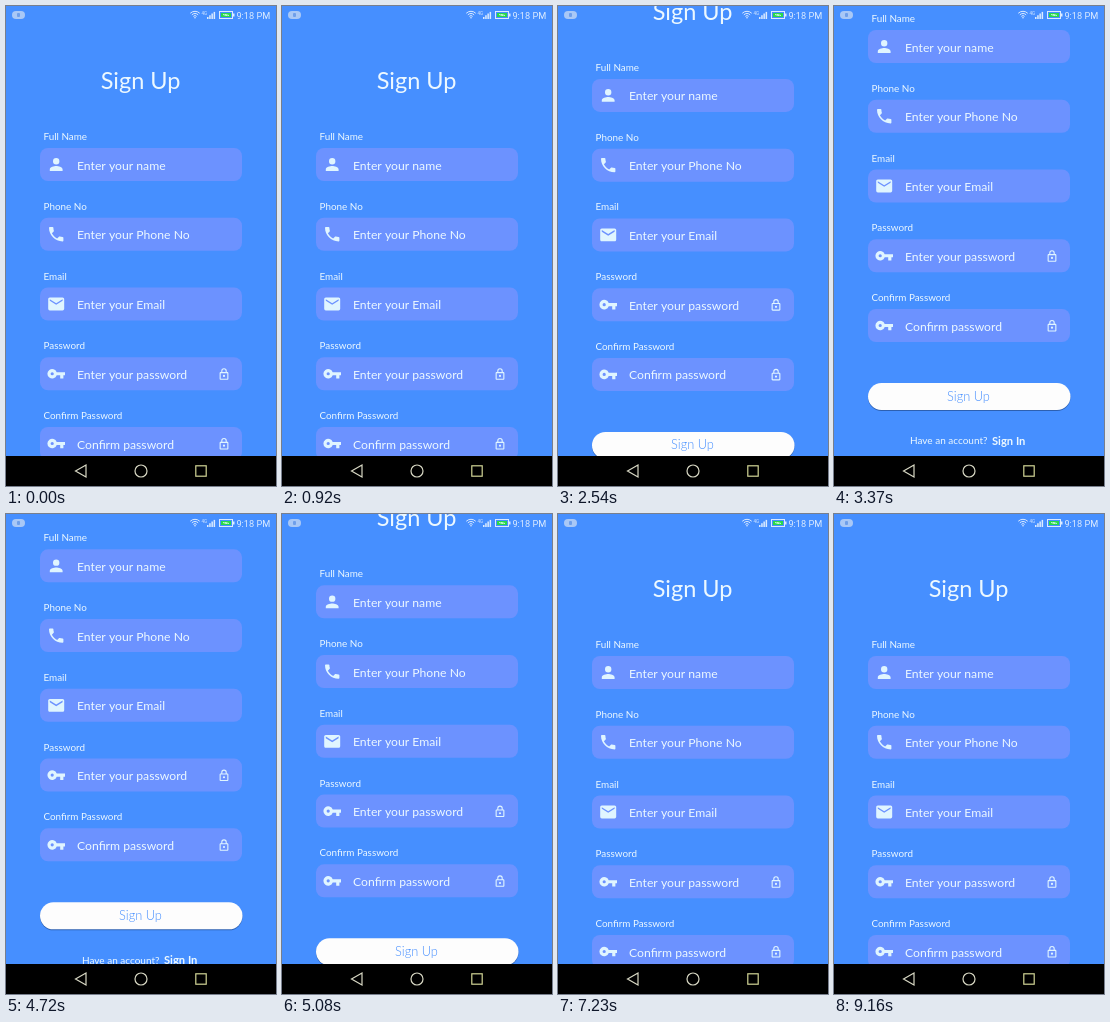
Animation of 270x480 px, one loop 9290 ms. Source, as an HTML page with a canvas:

```html
<!DOCTYPE html>
<html lang="en">
<head>
<meta charset="utf-8">
<title>Sign Up</title>
<style>
html, body { margin: 0; width: 100%; height: 100%; overflow: hidden; background: #468fff; }
canvas { display: block; width: 270px; height: 480px; }
</style>
</head>
<body>
<canvas id="stage"></canvas>
<script>
const LOOP = 9290, W = 270, H = 480, NAV_TOP = 450, MAX_SCROLL = 118;
const BG = '#468fff', FIELD = '#6c92ff', ICON = '#e0f5ff', TEXT = '#ecf8ff', STATUS = '#dcebff';
const canvas = document.getElementById('stage');
const ctx = canvas.getContext('2d');
const dpr = window.devicePixelRatio || 1;
canvas.width = W * dpr;
canvas.height = H * dpr;

const icons = {
  person: new Path2D('M12 12a4 4 0 1 0 0-8a4 4 0 0 0 0 8zM12 14c-2.67 0-8 1.34-8 4v2h16v-2c0-2.66-5.33-4-8-4z'),
  phone: new Path2D('M6.6 10.8c1.45 2.83 3.77 5.14 6.6 6.6l2.2-2.2c.27-.27.67-.36 1-.24 1.1.37 2.3.57 3.6.57.55 0 1 .45 1 1V20c0 .55-.45 1-1 1C10.6 21 3 13.4 3 4c0-.55.45-1 1-1h3.5c.55 0 1 .45 1 1 0 1.25.2 2.45.57 3.57.1.35.03.74-.25 1z'),
  mail: new Path2D('M20 4H4c-1.1 0-2 .9-2 2v12c0 1.1.9 2 2 2h16c1.1 0 2-.9 2-2V6c0-1.1-.9-2-2-2zm0 4l-8 5-8-5V6l8 5 8-5z'),
  key: new Path2D('M12.65 10A6 6 0 1 0 12.65 14H17v4h4v-4h2v-4zM7 14a2 2 0 1 1 0-4a2 2 0 0 1 0 4z'),
  lock: new Path2D('M18 8h-1V6A5 5 0 0 0 7 6v2H6c-1.1 0-2 .9-2 2v10c0 1.1.9 2 2 2h12c1.1 0 2-.9 2-2V10c0-1.1-.9-2-2-2zM9 6a3 3 0 0 1 6 0v2H9zM18 20H6V10h12zM12 17a2 2 0 1 0 0-4a2 2 0 0 0 0 4z')
};

const fields = [
  ['Full Name', 'Enter your name', 'person'],
  ['Phone No', 'Enter your Phone No', 'phone'],
  ['Email', 'Enter your Email', 'mail'],
  ['Password', 'Enter your password', 'key', true],
  ['Confirm Password', 'Confirm password', 'key', true]
];

function ease(t, start, end) {
  const u = Math.min(1, Math.max(0, (t - start) / (end - start)));
  return u * u * (3 - 2 * u);
}

function scrollAt(t) {
  return MAX_SCROLL * (ease(t, 1900, 3050) - ease(t, 4436, 5923));
}

function text(str, x, y, size, color = TEXT, align = 'left', weight = 400, family = 'Lato') {
  ctx.font = `${weight} ${size}px ${family}, sans-serif`;
  ctx.textAlign = align;
  ctx.fillStyle = color;
  ctx.fillText(str, x, y);
}

function box(x, y, w, h, r, color) {
  ctx.fillStyle = color;
  ctx.beginPath();
  ctx.roundRect(x, y, w, h, r);
  ctx.fill();
}

function icon(name, cx, cy, scale) {
  ctx.save();
  ctx.translate(cx, cy);
  ctx.scale(scale, scale);
  ctx.translate(-12, -12);
  ctx.fillStyle = ICON;
  ctx.fill(icons[name], 'evenodd');
  ctx.restore();
}

function drawForm(scroll) {
  ctx.save();
  ctx.beginPath();
  ctx.rect(0, 0, W, NAV_TOP);
  ctx.clip();
  ctx.translate(0, -scroll);
  text('Sign Up', 134.5, 83, 23.5, TEXT, 'center');
  fields.forEach(([label, hint, name, locked], i) => {
    const y = 142 + i * 69.75;
    text(label, 37.5, y - 8, 9.9);
    box(34, y, 202, 33, 8, FIELD);
    icon(name, 50.2, y + 16.5, 0.8);
    text(hint, 71, y + 21.5, 12.2);
    if (locked) icon('lock', 218, y + 17, 0.55);
  });
  box(34, 496, 202.5, 27, 13.5, 'rgba(20,50,100,.5)');
  box(34, 495, 202.5, 27, 13.5, '#fdfdfd');
  text('Sign Up', 134.5, 512.5, 12.8, BG, 'center', 300);
  text('Have an account?', 76, 556.2, 10);
  text('Sign In', 158, 556.7, 11.2, TEXT, 'left', 700);
  ctx.restore();
}

function drawStatus() {
  box(6, 5, 13, 8, 4, '#a9c8f6');
  box(11, 7, 3, 4, 1, '#6f9fea');

  ctx.strokeStyle = STATUS;
  ctx.lineWidth = 1;
  for (const r of [2.3, 4.5, 6.7]) {
    ctx.beginPath();
    ctx.arc(189, 12, r, -Math.PI * 0.75, -Math.PI * 0.25);
    ctx.stroke();
  }
  box(188.2, 11, 1.6, 1.6, 0.8, STATUS);
  text('4G', 195.5, 8.5, 4.5, STATUS, 'left', 400, 'Roboto');
  for (let i = 0; i < 4; i++) {
    const h = 2 + i * 1.7;
    box(201 + i * 2.2, 13 - h, 1.5, h, 0, STATUS);
  }

  ctx.strokeRect(213.5, 5.5, 13, 7);
  box(227, 7.5, 1.5, 3, 0, STATUS);
  box(215, 7, 10, 4, 0, '#28d94b');
  ctx.strokeStyle = '#fff';
  ctx.lineWidth = 0.8;
  ctx.beginPath();
  ctx.moveTo(217, 8.5);
  ctx.lineTo(220.5, 9.5);
  ctx.lineTo(219.5, 8.5);
  ctx.lineTo(223, 9.5);
  ctx.stroke();
  text('9:18 PM', 264.2, 12.7, 9.2, STATUS, 'right', 400, 'Roboto');
}

function drawNav() {
  box(0, NAV_TOP, W, H - NAV_TOP, 0, '#000');
  ctx.strokeStyle = '#d8d8c4';
  ctx.lineWidth = 1.2;
  ctx.beginPath();
  ctx.moveTo(69.5, 465);
  ctx.lineTo(80, 459);
  ctx.lineTo(80, 471);
  ctx.closePath();
  ctx.stroke();
  ctx.beginPath();
  ctx.arc(135, 465, 6, 0, Math.PI * 2);
  ctx.stroke();
  ctx.strokeStyle = '#d2d596';
  ctx.strokeRect(189.8, 459.8, 10.4, 10.4);
}

function render(now) {
  ctx.setTransform(dpr, 0, 0, dpr, 0, 0);
  box(0, 0, W, H, 0, BG);
  drawForm(scrollAt(now % LOOP));
  drawStatus();
  drawNav();
}

const start = performance.now();
function tick() {
  render(performance.now() - start);
  requestAnimationFrame(tick);
}
tick();
</script>
</body>
</html>
```
